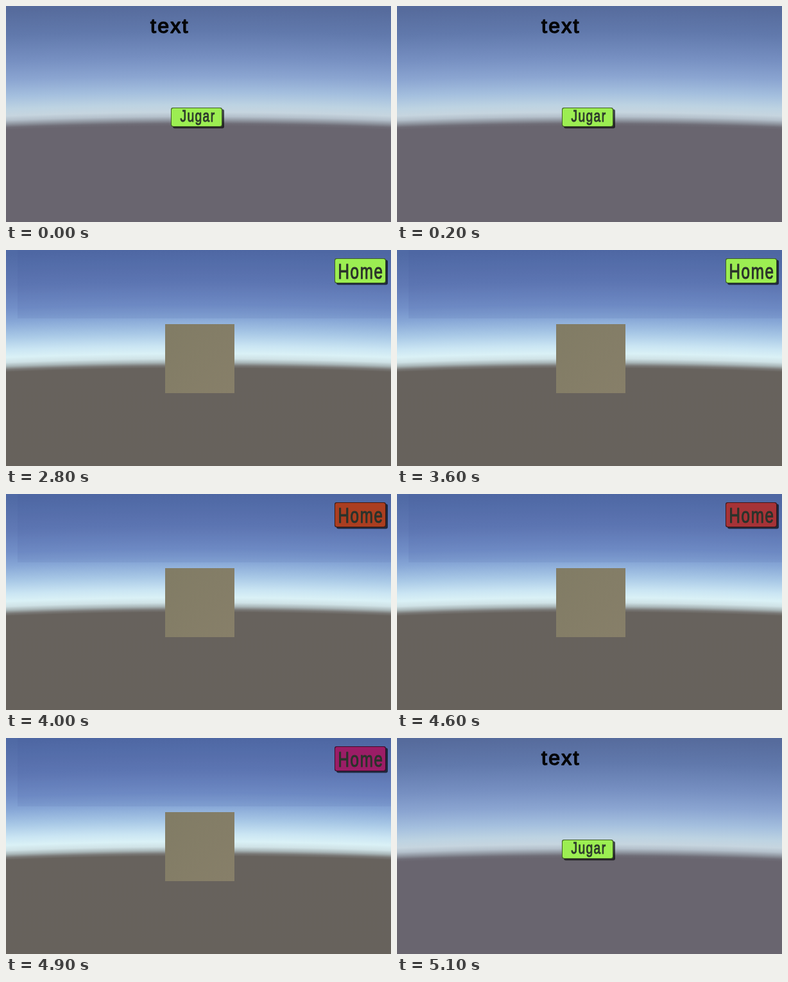
Recreate the animation shown at these times as an HTML page with a canvas. Size 600 px wide and 338 px high, loop 7800 ms.

```html
<!DOCTYPE html>
<html lang="es">
<head>
<meta charset="utf-8">
<title>Menu</title>
<style>
  html, body { margin: 0; width: 100%; height: 100%; overflow: hidden; background: #69656f; }
  canvas { display: block; }
</style>
</head>
<body>
<canvas id="stage" width="600" height="338"></canvas>
<script>
const W = 600, H = 338, LOOP = 7800, STEP = 100;
const ctx = document.getElementById('stage').getContext('2d');

// Gradient stops as [y, colour]
const MENU_SKY = [
  [0, '#566b9c'], [40, '#6179ac'], [80, '#768fc1'], [110, '#8ba5d1'],
  [135, '#a4bfde'], [155, '#bdd3e2'], [166, '#c6d5df'], [173, '#b4c0cb'],
  [179, '#8f959f'], [184, '#6f6d77'], [188, '#69656f'], [338, '#69656f']
];
const GAME_SKY = [
  [0, '#506aa5'], [50, '#6079b5'], [85, '#728fc8'], [106, '#86a6d6'],
  [130, '#a8c8e6'], [150, '#cae5f3'], [162, '#daf1f6'], [170, '#cfe2e6'],
  [176, '#a9b6b8'], [181, '#797876'], [185, '#67625d'], [338, '#67625c']
];

const GREEN = [156, 238, 82], RED = [171, 62, 32], PURPLE = [155, 29, 102];

// Button tint by time: [ms, colour]; the tint runs evenly between entries
const TINT = [
  [0, GREEN], [3700, GREEN], [4000, RED], [4500, RED], [4800, PURPLE], [LOOP, PURPLE]
];

function tintAt(t) {
  const i = TINT.findIndex(([ms]) => ms > t);
  const [t0, a] = TINT[i - 1], [t1, b] = TINT[i];
  const k = (t - t0) / (t1 - t0);
  return a.map((v, n) => Math.round(v + (b[n] - v) * k));
}

// Each column slides down toward the sides so the horizon bows.
function makeSky(stops) {
  const sky = document.createElement('canvas');
  sky.width = W;
  sky.height = H;
  const c = sky.getContext('2d');
  for (let x = 0; x < W; x++) {
    const dip = 6 * ((x - W / 2) / (W / 2)) ** 2;
    const g = c.createLinearGradient(0, dip, 0, H + dip);
    for (const [y, colour] of stops) g.addColorStop(y / H, colour);
    c.fillStyle = g;
    c.fillRect(x, 0, 1, H);
  }
  return sky;
}

function label(text, x, y, size, squeeze, colour, weight) {
  ctx.save();
  ctx.translate(x, y);
  ctx.scale(squeeze, 1);
  ctx.font = `${size}px "Liberation Sans", Arial, sans-serif`;
  ctx.letterSpacing = `${size * 0.07}px`;
  ctx.fillStyle = ctx.strokeStyle = colour;
  ctx.lineWidth = weight;
  ctx.lineJoin = 'round';
  ctx.fillText(text, 0, 0);
  ctx.strokeText(text, 0, 0);
  ctx.restore();
}

function panel(x, y, w, h, colour) {
  ctx.beginPath();
  ctx.roundRect(x, y, w, h, 3);
  ctx.fillStyle = colour;
  ctx.fill();
}

function button(x, y, w, h, tint) {
  panel(x + 3, y + 2.5, w, h, 'rgba(0, 0, 0, 0.65)');
  panel(x, y, w, h, `rgb(${tint.map(v => Math.round(v * 0.4))})`);
  panel(x + 1, y + 1, w - 2, h - 2, `rgb(${tint})`);
}

const menuSky = makeSky(MENU_SKY), gameSky = makeSky(GAME_SKY);

function drawMenu() {
  ctx.drawImage(menuSky, 0, 0);
  label('text', 225, 41.5, 32, 1, '#050608', 1.5);
  button(257, 159, 80, 30, GREEN);
  label('Jugar', 271.5, 181, 25, 0.77, '#2c382c', 1);
}

function drawGame(t) {
  ctx.drawImage(gameSky, 0, 0);
  ctx.fillStyle = 'rgba(60, 85, 150, 0.1)';
  ctx.fillRect(18, 0, W - 18, 107);

  const face = ctx.createLinearGradient(248, 116, 356, 224);
  face.addColorStop(0, '#817c65');
  face.addColorStop(1, '#877f69');
  ctx.fillStyle = face;
  ctx.fillRect(248, 116, 108, 108);

  button(512, 13, 80, 39, tintAt(t));
  label('Home', 517.5, 45, 34, 0.71, '#2b332b', 1.2);
}

function render(now) {
  const t = Math.floor((now % LOOP) / STEP) * STEP;
  if (t >= 2200 && t < 5100) drawGame(t);
  else drawMenu();
}

const start = performance.now();
function tick() {
  render(performance.now() - start);
  requestAnimationFrame(tick);
}
tick();
</script>
</body>
</html>
```
